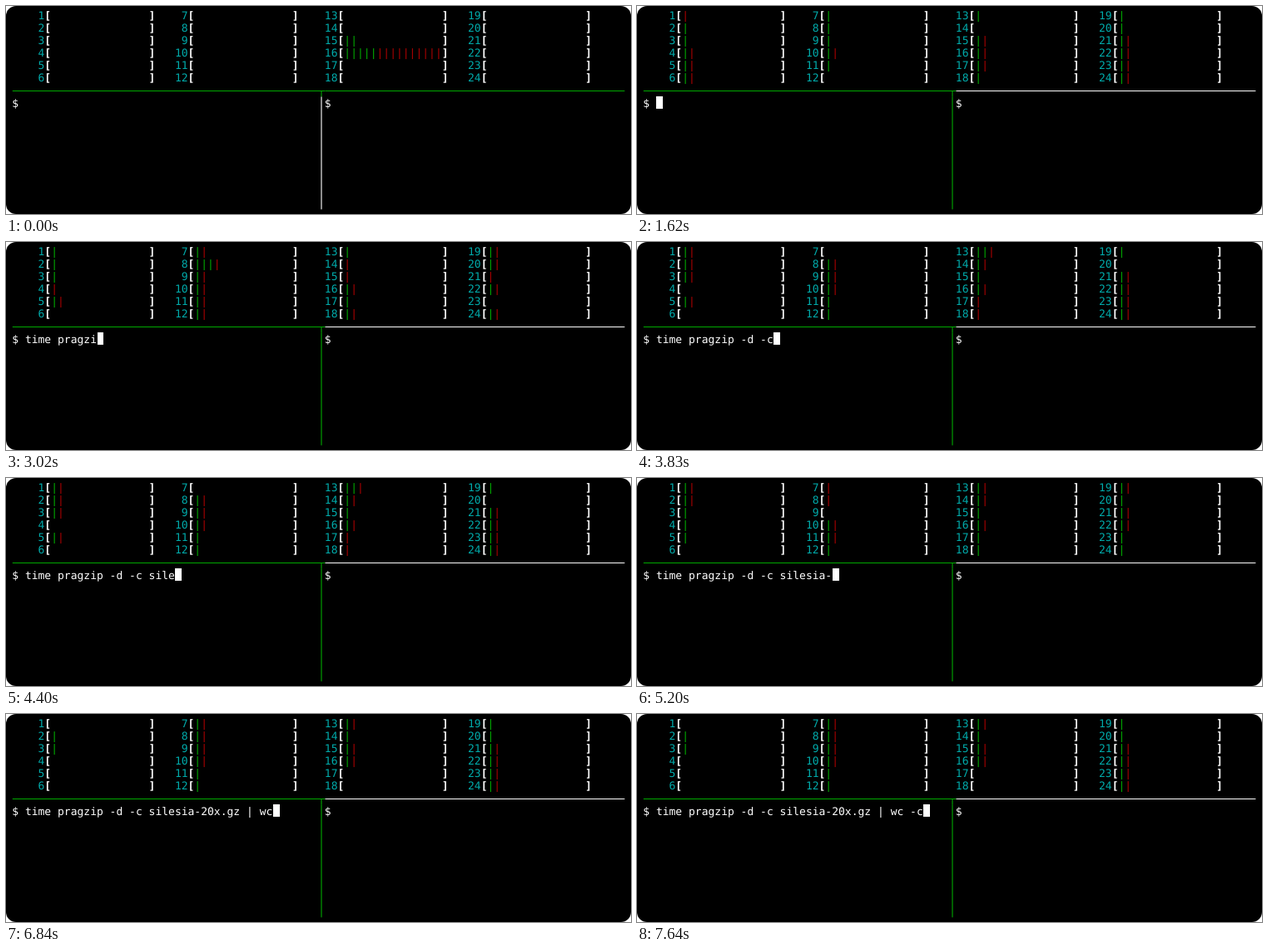
Animation of 751x251 px, one loop 8000 ms. Source, as an HTML page:

```html
<!DOCTYPE html>
<html lang="en">
<head>
<meta charset="utf-8">
<title>Terminal</title>
<style>
  html, body { margin: 0; width: 100%; height: 100%; overflow: hidden; background: #fff; }
  svg { display: block; width: 751px; height: 251px; }
  text {
    font: 13px "DejaVu Sans Mono", monospace;
    text-rendering: geometricPrecision;
    white-space: pre;
    fill: #fff;
  }
  .bold { font-weight: bold; }
  .cyan { fill: #0aa; }
  .green { fill: #0a0; }
  .red { fill: #a00; }
  .white { fill: #fff; }
</style>
</head>
<body>
<svg id="stage" viewBox="0 0 751 251"></svg>
<script>
const LOOP = 8000;
const CELL = 7.826;
const LINE = 15.13;
const FOCUS_AT = 1620;
const COMMAND = "time pragzip -d -c silesia-20x.gz | wc -c";

// Moment at which each character of COMMAND is typed.
const KEYS = [
  1820, 1910, 2010, 2070, 2200, 2320, 2420, 2510, 2710,
  2890, 3020, 3120, 3230, 3390, 3490, 3630, 3730, 3830,
  3990, 4080, 4160, 4310, 4400, 4550, 4670, 4790, 4910,
  5230, 5380, 5550, 5700, 5830, 6010, 6120, 6370,
  6630, 6750, 6840, 7410, 7530, 7640
];

// Load of cores 1 to 24: g = user (green), r = kernel (red), - = idle.
const LOADS = [
  [0, "- - - - - - - - - - - - - - gg gggggrrrrrrrrrr - - - - - - - -"],
  [500, "r g g gr gr gr g g g gr g - g - gr gr gr g g g gr gr gr gr"],
  [2070, "g g g r gr - gr gggr gr gr gr gr g r r gr g gr gr gr r gr - gr"],
  [3630, "gr gr gr - gr - - gr gr gr g g ggr gr g gr r r g - gr gr gr gr"],
  [5200, "gr gr g g g - r r - gr gr g gr gr g gr g g gr g gr gr g g"],
  [6750, "- g g - - - gr gr gr gr g g gr g gr gr - - g g gr gr gr gr"]
].map(([at, cores]) => ({ at, cores: cores.split(" ") }));

const stage = document.getElementById("stage");

function add(tag, attrs, parent = stage) {
  const el = document.createElementNS("http://www.w3.org/2000/svg", tag);
  for (const name in attrs) el.setAttribute(name, attrs[name]);
  parent.appendChild(el);
  return el;
}

const edge = col => Math.round((col + 1) * CELL - 0.06);

function rect(x, y, width, height, cls) {
  return add("rect", { x, y, width, height, class: cls });
}

function label(col, row, str, cls = "white") {
  const el = add("text", {
    x: ((col + 1) * CELL - 0.6).toFixed(2),
    y: Math.floor(16.1 + row * LINE),
    class: cls
  });
  el.textContent = str;
  return el;
}

add("rect", { width: 751, height: 251, rx: 12, fill: "#000" });

const meters = [];
[5, 27, 50, 72].forEach((col, group) => {
  for (let row = 0; row < 6; row++) {
    label(col - 2, row, String(group * 6 + row + 1).padStart(2, "\u00a0"), "cyan");
    label(col, row, "[", "bold");
    label(col + 16, row, "]", "bold");
    const bar = label(col + 1, row, "");
    meters.push({
      user: add("tspan", { class: "green" }, bar),
      kernel: add("tspan", { class: "red" }, bar)
    });
  }
});

// Pane borders
rect(7.8, 102, 375.7, 1, "green");
const topRight = rect(383.5, 102, 359.9, 1);
rect(378.45, 103, 1.1, 6.5, "green");
const divider = rect(378.45, 109.5, 1.1, 135.9);

label(0, 7, "$");
label(48, 7, "$");
const typed = label(2, 7, "");
const cursor = rect(0, 109, 8, 15, "white");

function render(t) {
  const { cores } = LOADS.filter(load => load.at <= t).pop();
  meters.forEach(({ user, kernel }, i) => {
    const count = kind => cores[i].split(kind).length - 1;
    user.textContent = "|".repeat(count("g"));
    kernel.textContent = "|".repeat(count("r"));
  });

  const focused = t >= FOCUS_AT;
  topRight.setAttribute("class", focused ? "white" : "green");
  divider.setAttribute("class", focused ? "green" : "white");

  const length = KEYS.filter(at => at <= t).length;
  typed.textContent = COMMAND.slice(0, length);
  const col = length + 2;
  cursor.setAttribute("x", edge(col));
  cursor.setAttribute("width", edge(col + 1) - edge(col));
  cursor.setAttribute("visibility", focused ? "visible" : "hidden");
}

const start = performance.now();

function frame() {
  render((performance.now() - start) % LOOP);
  requestAnimationFrame(frame);
}

frame();
</script>
</body>
</html>
```
